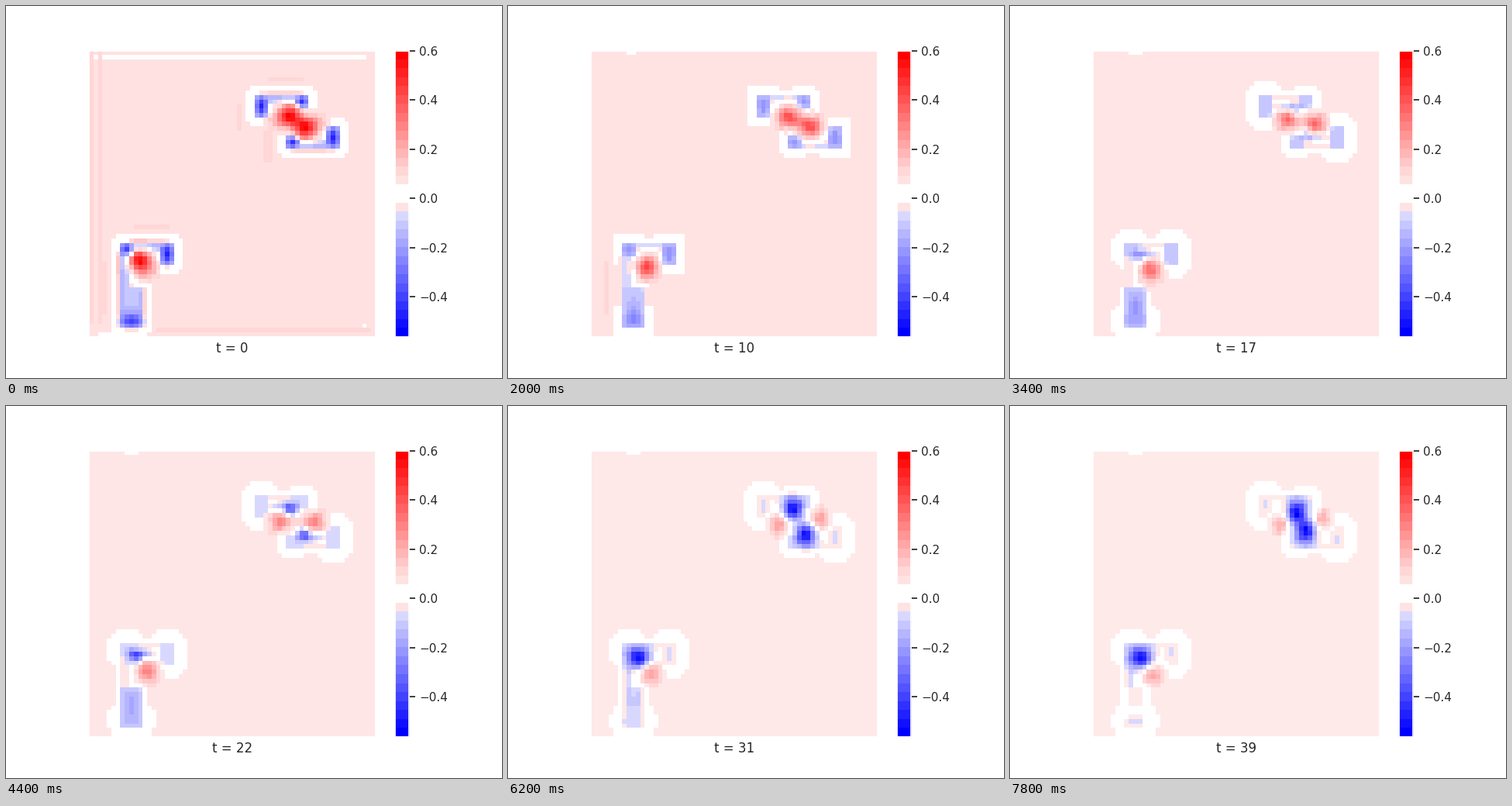
Write a matplotlib script that moves like this. It is 640 px wide and 480 px high and loops after 8000 ms.

```python
import numpy as np
import matplotlib.pyplot as plt
from matplotlib.animation import FuncAnimation

N, STEPS, DELAY = 64, 40, 200
VMIN, VMAX, BINS = -0.563, 0.6, 32
BASE = 0.066
INK = "#262626"

plt.rcParams.update({
    "font.family": "DejaVu Sans",
    "axes.edgecolor": "white", "axes.linewidth": 1.25,
    "axes.labelcolor": INK, "axes.labelsize": 12,
})

X, Y = np.meshgrid(np.arange(N) + 0.5, np.arange(N) + 0.5)


# --- timing -----------------------------------------------------------
def ease(t, start, stop):
    p = np.clip((t - start) / (stop - start), 0, 1)
    return p * p * (3 - 2 * p)


def fade(t, tau):
    return np.exp(-t / tau)


def pulse(t, mid, width):
    return np.exp(-((t - mid) / width) ** 2 / 2)


# --- shapes on the cell grid; a rect is (c0, c1, r0, r1) ----------------
def step(d, s):
    return 1 / (1 + np.exp(-np.clip(d / s, -40, 40)))


def box(x, y, rect, s=0.2):
    c0, c1, r0, r1 = rect
    return ((step(x - c0, s) - step(x - c1, s))
            * (step(y - r0, s) - step(y - r1, s)))


def blob(x, y, cx, cy, sx, sy):
    return np.exp(-((x - cx) / sx) ** 2 / 2 - ((y - cy) / sy) ** 2 / 2)


def halo(x, y, rect, reach):
    """Rounded area around a rect."""
    c0, c1, r0, r1 = rect
    dx = np.maximum(np.maximum(c0 - x, x - c1), 0)
    dy = np.maximum(np.maximum(r0 - y, y - r1), 0)
    return step(reach - np.hypot(dx, dy), 0.06)


def halos(x, y, t, ends, edges):
    """White rims: ends spread, long edges dissolve and come back."""
    edge_reach = min(1.75 - 0.55 * ease(t, 12, 18), abs(t - 15) / 4)
    parts = [halo(x, y, rect, 1.9 + spread * ease(t, 0, 16))
             for rect, spread in ends]
    parts += [halo(x, y, rect, edge_reach) for rect in edges]
    return -0.036 * np.maximum.reduce(parts)


# --- parts ------------------------------------------------------------
def end(x, y, rect, t):
    """Blue block that fades from the middle outwards."""
    c0, c1, r0, r1 = rect
    core = blob(x, y, (c0 + c1) / 2, (r0 + r1) / 2, 0.9, 0.3 * (r1 - r0))
    return (-(0.17 - 0.11 * ease(t, 8, 40)) * box(x, y, rect)
            + (0.08 * pulse(t, 21, 6) - 0.3 * fade(t, 7) - 0.03) * core)


def bar(x, y, c0, c1, r, t):
    """Blue top edge, paler below, with a red overshoot above."""
    return (-(0.06 + 0.14 * fade(t, 10)) * box(x, y, (c0, c1, r, r + 1))
            - (0.02 + 0.1 * fade(t, 6)) * box(x, y, (c0, c1, r + 1, r + 2))
            + 0.12 * fade(t, 8) * box(x, y, (c0 - 1, c1 + 2, r - 1, r)))


def red(x, y, cx, cy, t):
    return (0.13 + 0.3 * fade(t, 18)) * blob(x, y, cx, cy, 1.65, 1.65)


def patch(x, y, cx, cy, wide, tall, t):
    """Blue corner that appears halfway and swells."""
    grow = ease(t, 18, 34)
    return (-0.56 * ease(t, 9, 31)
            * blob(x, y, cx, cy, 1 + wide * grow, 1 + tall * grow)
            - 0.2 * pulse(t, 20, 5) * blob(x, y, cx - 2, cy - 0.5, 1.7, 0.6))


def half_s(x, y, t):
    big, small, top = (37, 40, 10, 15), (46, 49, 10, 13), (40, 46, 10, 11)
    v = end(x, y, big, t) + end(x, y, small, t) + bar(x, y, 40, 46, 10, t)
    v += halos(x, y, t, [(big, 0.7), (small, 0)], [top])
    drift, late = ease(t, 0, 32), ease(t, 30, 40)
    v += red(x, y, 45 - 3 * drift, 14.2 + 2.1 * drift, t)
    v += 0.16 * fade(t, 12) * blob(x, y, 43, 15.6, 2.5, 1.4)
    v += patch(x, y, 45 + 0.3 * late, 13.2 + 0.8 * late, 0.6, 0.9, t)
    return v


def flag(x, y, t):
    big, small, top = (16, 19, 43, 48), (7, 10, 43, 46), (10, 16, 43, 44)
    neck, stem, foot = (7, 9.4, 46, 53), (7, 12, 53, 62), (7, 12, 59, 62)
    v = end(x, y, big, t) + end(x, y, small, t) + bar(x, y, 10, 16, 43, t)
    v += halos(x, y, t, [(big, 0.7), (small, 0.7), (foot, 0.6)],
               [top, neck, stem])

    v -= (0.14 - 0.1 * ease(t, 20, 40)) * box(x, y, stem)
    v -= (0.15 - 0.09 * ease(t, 3, 16)) * box(x, y, neck)
    v -= 0.28 * fade(t, 10) * blob(x, y, 9.5, 60.4, 1.9, 1.1)
    v -= 0.1 * pulse(t, 18, 9) * blob(
        x, y, 9.5, 59 - 3 * ease(t, 0, 30), 1, 2)
    v -= 0.045 * ease(t, 30, 39) * box(x, y, (7, 11, 60, 62))
    for c, r in (8, 49), (10, 52):
        v -= 0.045 * ease(t, 24, 32) * box(x, y, (c, c + 1, r, 57))
    # dark rims with a red overshoot outside
    for inner, outer, r in (7, 6, 45), (11, 12, 53):
        v -= 0.06 * fade(t, 3) * box(x, y, (inner, inner + 1, r, 59))
        v += 0.13 * fade(t, 9) * box(x, y, (outer, outer + 1, r, 59))

    drift, late = 1 - fade(t, 12), ease(t, 20, 34)
    v += red(x, y, 10.9 + 2.8 * drift, 46.6 + 3.2 * drift, t)
    v += 0.2 * fade(t, 10) * blob(x, y, 12.6, 48.2, 1.9, 1.8)
    # the tail of this patch points right, so it is drawn mirrored
    v += patch(-x, y, -10.4 - 0.4 * late, 46 + 0.4 * late, 0.8, 0.7, t)
    return v


def border(x, y, t):
    """Faint ripples and the white marks along the edges."""
    def mark(*rect):
        return box(x, y, rect, 0.05)

    first = max(0, 1 - t / 3)
    ripple = 0.034 * (1 - ease(t, 6, 13))
    late = 0.03 * ease(t, 6, 12)
    v = 0.034 * first * (mark(2, 3, 0, 43) + mark(0, 1, 0, 61)
                         + mark(15, 63, 62, 63))
    v -= 0.03 * first * (mark(3, 62, 1, 2) + mark(2, 13, 63, 64)
                         + mark(61, 62, 61, 62))
    v -= (0.03 - late) * mark(1, 2, 1, 2)
    v += ripple * (mark(40, 48, 6, 7) + mark(33, 34, 12, 18)
                   + mark(39, 41, 18, 25) + mark(10, 18, 39, 40)
                   + mark(2, 3, 43, 61))
    v += 0.034 * (1 - ease(t, 13, 17)) * mark(3, 4, 47, 59)
    v -= late * (mark(8, 10 + ease(t, 13, 17), 0, 1) + mark(7, 12, 63, 64))
    return v


# --- picture ----------------------------------------------------------
def palette(pale):
    """Red to white to blue in 32 steps, with pale pink beside the white."""
    i = np.arange(BINS)
    rgb = np.full((BINS, 3), 255.0)
    rgb[:15, 1:] = (16.6 * i[:15])[:, None]
    rgb[18:, :2] = (216 * (31 - i[18:]) / 13)[:, None]
    rgb[[14, 17], 1:] = pale
    return rgb.astype(np.uint8)


def picture(t):
    v = BASE + half_s(X, Y, t) + half_s(93 - X, 32 - Y, t)
    v += flag(X, Y, t) + border(X, Y, t)
    level = np.floor((VMAX - v) / (VMAX - VMIN) * BINS).astype(int)
    return palette(225.5 + 0.22 * t)[np.clip(level, 0, BINS - 1)]


fig = plt.figure(figsize=(6.4, 4.8), dpi=100, facecolor="white")


def panel(left, width, image, extent):
    ax = fig.add_axes([left / 640, 0.11, width / 640, 0.77])
    art = ax.imshow(image, extent=extent, aspect="auto",
                    interpolation="nearest")
    ax.set_xticks([])
    return ax, art


ax, heat = panel(107.2, 369.6, picture(0), (0, N, N, 0))
ax.set_yticks([])

cax, _ = panel(501.6, 18.48, palette(226)[:, None], (0, 1, VMIN, VMAX))
cax.yaxis.tick_right()
ticks = np.arange(-2, 4) / 5
cax.set_yticks(ticks, [f"{v:.1f}".replace("-", "\u2212") for v in ticks])
cax.tick_params(axis="y", length=6, width=1.25, labelsize=11,
                color=INK, labelcolor=INK)


def draw(t):
    heat.set_data(picture(t))
    ax.set_xlabel(f"t = {t}")
    return [heat]


anim = FuncAnimation(fig, draw, frames=STEPS, interval=DELAY,
                     repeat=True, repeat_delay=0, blit=False)
plt.show()
```
